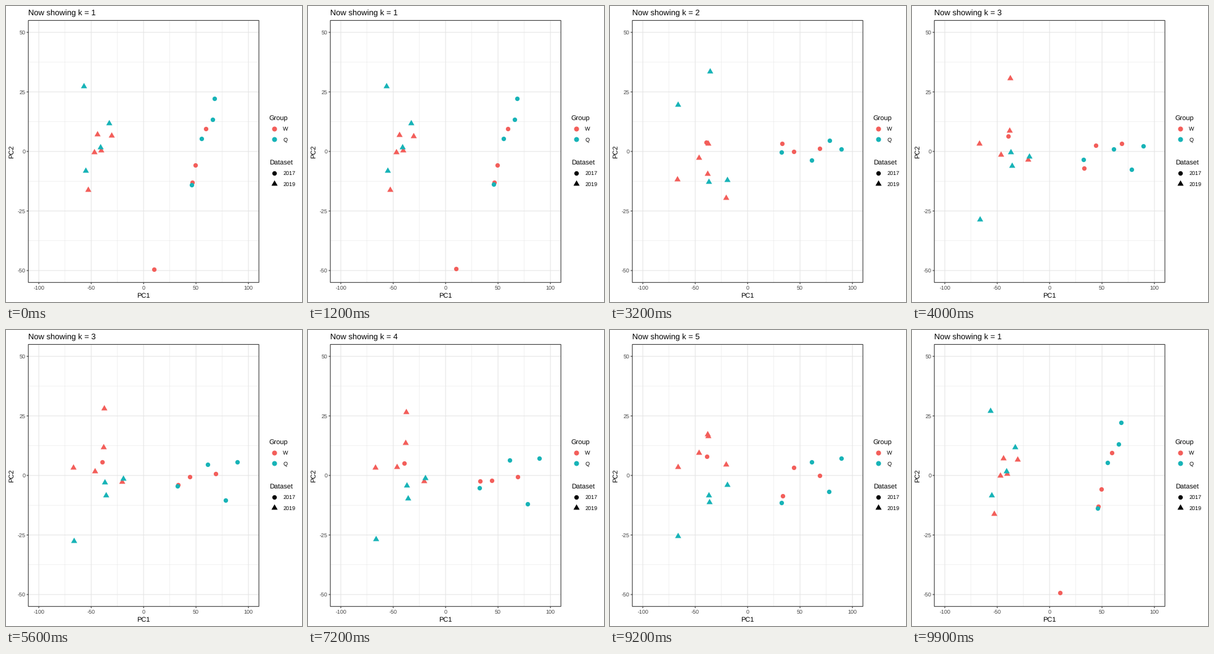
A matplotlib script for the animation above (10 s loop, 480 by 480 pixels).

```python
import matplotlib.pyplot as plt
import numpy as np
from matplotlib.animation import FuncAnimation
from matplotlib.patches import Rectangle

PX = 0.72  # one pixel in points at 100 dpi
RED, TEAL = "#F35E5A", "#17B3B7"
GREY, DARK, TEXT = "#E5E5E5", "#333333", "#444444"
LEFT, RIGHT, TOP, BOTTOM = 36.2, 410.1, 23.4, 448.3
STATES, STEP, HOLD = 5, 20, 11
TRIANGLE = [(0, 5.8), (-5, -2.9), (5, -2.9), (0, 5.8)]

# Each sample: its settled PC1, then its PC2 at k = 1 to 5
SAMPLES = {
    (RED, "o"): [(-39.3, -49.5, 3.9, 6.5, 5.1, 8.2),
                 (68.7, 9.6, 1.3, 3.3, -0.6, -0.2),
                 (44, -5.7, 0, 2.6, -2.1, 3.4),
                 (33.1, -13.1, 3.5, -7.1, -2.4, -8.6)],
    (RED, "^"): [(-37.8, 7.1, 3.1, 30.8, 26.6, 16.5),
                 (-20.6, 6.7, -19.5, -3.3, -2.3, 4.7),
                 (-46.6, -0.2, -2.7, -1.3, 3.6, 9.6),
                 (-38.2, 0.6, -9.4, 8.8, 13.6, 17.4),
                 (-66.9, -16.2, -11.8, 3.4, 3.2, 3.7)],
    (TEAL, "o"): [(89.5, 22.3, 1.1, 2.4, 7.3, 7),
                  (77.9, 13.4, 4.8, -7.5, -12, -7),
                  (61.1, 5.4, -3.7, 1, 6.5, 5.6),
                  (32.1, -13.9, -0.2, -3.5, -5.1, -11.4)],
    (TEAL, "^"): [(-36.2, 27.3, 33.8, -5.9, -9.6, -11.4),
                  (-19.5, 11.9, -11.9, -2, -1.1, -4.1),
                  (-37, 1.9, -12.9, -0.2, -4.2, -8.4),
                  (-66.8, -8.1, 19.9, -28.5, -26.8, -25.4)],
}

plt.rcParams.update({"font.family": "Liberation Sans", "text.hinting": "none",
                     "text.hinting_factor": 1})
fig = plt.figure(figsize=(4.8, 4.8), dpi=100, facecolor="white")
ax = fig.add_axes([0, 0, 1, 1])
ax.set(xlim=(0, 480), ylim=(480, 0))
ax.axis("off")


def to_x(pc1):
    return (LEFT + RIGHT) / 2 + pc1 * (RIGHT - LEFT) / 220


def to_y(pc2):
    return (TOP + BOTTOM) / 2 - pc2 * (BOTTOM - TOP) / 110


def line(xs, ys, color=GREY, width=1.07, z=2):
    ax.plot(xs, ys, color=color, lw=width * PX, zorder=z,
            solid_capstyle="butt", snap=False)


def label(x, y, text, size, color="black", **align):
    return ax.text(x, y, text, size=size * PX, color=color, **align)


def dots(x, y, color, shape, radius=3.65, z=5):
    marker, half = ("o", radius) if shape == "o" else (TRIANGLE, 5.8)
    marks = ax.scatter(x, y, s=(2 * half * PX) ** 2, marker=marker,
                       color=color, linewidths=0, zorder=z)
    marks.set_snap(False)
    return marks


def draw_panel():
    for i in range(-2, 3):
        x, y = to_x(50 * i), to_y(25 * i)
        line([x, x], [TOP, BOTTOM])
        line([LEFT, RIGHT], [y, y])
        line([x, x], [BOTTOM, BOTTOM + 2.75], DARK)
        line([LEFT - 2.75, LEFT], [y, y], DARK)
        label(x, 460.2, str(50 * i), 8.8, TEXT, ha="center")
        label(LEFT - 4.95, y + 3.2, str(25 * i), 8.8, TEXT, ha="right")
    for i in np.arange(-1.5, 2):
        x, y = to_x(50 * i), to_y(25 * i)
        line([x, x], [TOP, BOTTOM], width=0.53, z=1)
        line([LEFT, RIGHT], [y, y], width=0.53, z=1)
    ax.add_patch(Rectangle((LEFT, TOP), RIGHT - LEFT, BOTTOM - TOP, fill=False,
                           ec=DARK, lw=1.07 * PX, zorder=8, snap=False))
    label(to_x(0), 472.6, "PC1", 11, ha="center")
    label(9.6, to_y(0), "PC2", 11, ha="center", va="center", rotation=90)


def draw_legend(y, name, entries, radius):
    label(426.6, y, name, 11)
    for i, (text, color, shape) in enumerate(entries):
        key_y = y + 14.6 + 17.28 * i
        dots(435.2, key_y, color, shape, radius)
        label(449.4, key_y + 3.3, text, 8.8)


draw_panel()
draw_legend(184.4, "Group", [("W", RED, "o"), ("Q", TEAL, "o")], 4)
draw_legend(256.4, "Dataset", [("2017", "black", "o"), ("2019", "black", "^")], 3.65)
title = label(LEFT, 15.1, "", 13.2)


def sample_paths(rows):
    settled, *ys = np.array(rows).T
    # The first state is tilted: PC1 still leans on PC2.
    tilted = settled - 0.98 * ys[0] + 0.18 * ys[1]
    xs = [tilted] + [settled] * (STATES - 1)
    return np.stack([to_x(np.array(xs)), to_y(np.array(ys))], axis=-1)


groups = [(sample_paths(rows), dots([], [], *style, z=5 + 0.1 * i))
          for i, (style, rows) in enumerate(SAMPLES.items())]


def cubic_in_out(t):
    return 4 * t ** 3 if t < 0.5 else 1 - 4 * (1 - t) ** 3


def update(frame):
    state, step = divmod(frame, STEP)
    following = (state + 1) % STATES
    t = cubic_in_out(max(0, step - HOLD) / (STEP - HOLD))
    for path, marks in groups:
        marks.set_offsets((1 - t) * path[state] + t * path[following])
    nearest = state if step <= 16 else following
    title.set_text(f"Now showing k = {nearest + 1}")
    return [title] + [marks for _, marks in groups]


anim = FuncAnimation(fig, update, frames=STATES * STEP, interval=100,
                     repeat=True, repeat_delay=0, blit=False)
plt.show()
```
